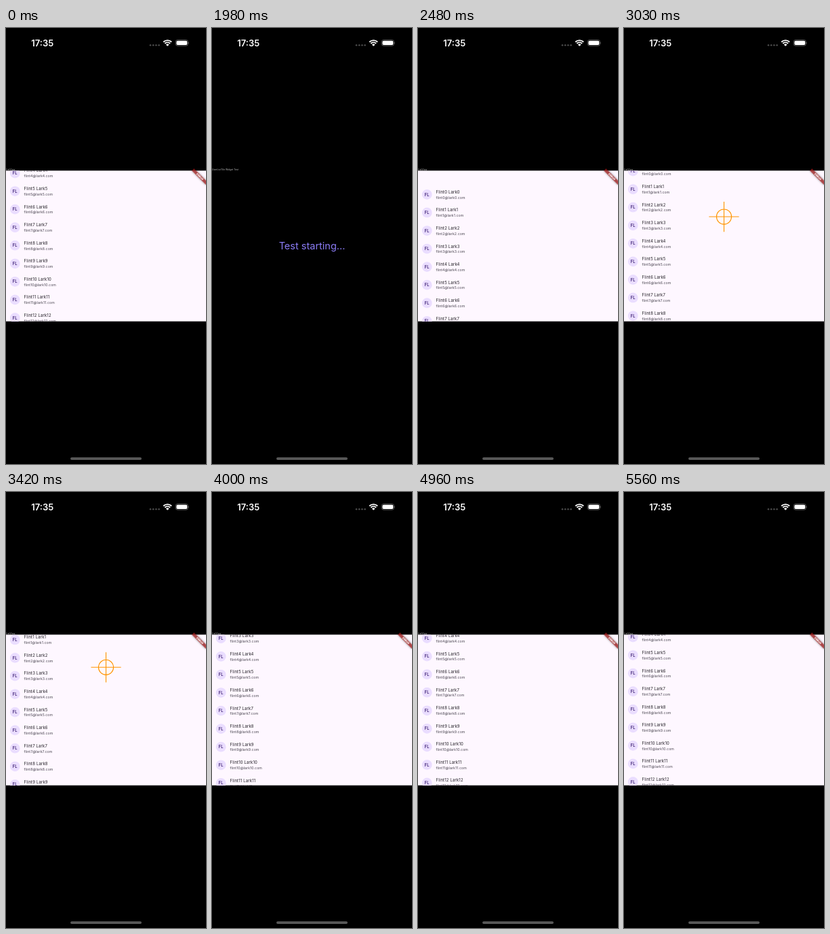
Animation, 295 px wide and 640 px high, one loop 8850 ms. Source, as an HTML page:

```html
<!DOCTYPE html>
<html lang="en">
<head>
<meta charset="utf-8">
<title>List scroll test</title>
<style>
  html, body { margin: 0; height: 100%; overflow: hidden; background: #000; }
  svg { display: block; width: 100vw; height: 100vh; font-family: Inter, sans-serif; }
  .clock { font-size: 13px; font-weight: 600; fill: #fff; }
  .label { font-size: 3.4px; fill: #b8b8b8; }
  .waiting { font-size: 14.5px; fill: #8b7cf6; text-anchor: middle; }
  .initials { font-size: 16px; font-weight: 500; letter-spacing: .15px; fill: #21005d; text-anchor: middle; }
  .name { font-size: 16px; letter-spacing: .5px; fill: #1d1b20; }
  .mail { font-size: 14px; letter-spacing: .25px; fill: #49454f; }
  .banner { font-size: 10.2px; font-weight: 900; fill: #fff; text-anchor: middle; }
</style>
</head>
<body>
<svg viewBox="0 0 295 640">
  <defs>
    <clipPath id="view"><rect width="800" height="600"/></clipPath>
    <filter id="blur" x="-30%" y="-150%" width="160%" height="400%"><feGaussianBlur stdDeviation="3.96"/></filter>
  </defs>
  <rect width="295" height="640"/>

  <!-- Status bar and home indicator -->
  <text class="clock" x="37.3" y="26.6">17:35</text>
  <g fill="#4a4a4a">
    <circle cx="213" cy="25.2" r="1.3"/><circle cx="217.2" cy="25.2" r="1.3"/>
    <circle cx="221.4" cy="25.2" r="1.3"/><circle cx="225.6" cy="25.2" r="1.3"/>
  </g>
  <g fill="none" stroke="#fff" stroke-width="1.9">
    <path d="M232.2 20.5a8.8 8.8 0 0 1 12 0"/>
    <path d="M234.3 22.7a5.7 5.7 0 0 1 7.8 0"/>
  </g>
  <path d="M235.9 24.4a3.3 3.3 0 0 1 4.6 0l-2.3 2.4z" fill="#fff"/>
  <rect x="250.2" y="17.5" width="18.3" height="8.7" rx="2.9" fill="none" stroke="#6a6a6a" stroke-width=".8"/>
  <rect x="251.4" y="18.7" width="15.9" height="6.3" rx="1.8" fill="#fff"/>
  <path d="M269.4 20.4q1.4 1.4 0 2.9z" fill="#777"/>
  <rect x="95" y="630.2" width="105" height="3.8" rx="1.9" fill="#595959"/>

  <text class="label" id="label" x="0" y="209.3"></text>
  <text class="waiting" id="waiting" x="147.5" y="325.4">Test starting...</text>

  <!-- 800 x 600 test surface -->
  <g id="surface" transform="translate(0 209.375) scale(.36875)">
    <rect width="800" height="600" fill="#fef7ff"/>
    <g clip-path="url(#view)"><g id="list"></g></g>
    <g transform="translate(800 0) rotate(45)">
      <rect x="-40" y="28" width="80" height="12" fill="#000" fill-opacity=".5" filter="url(#blur)"/>
      <rect x="-40" y="28" width="80" height="12" fill="#b71c1c" fill-opacity=".63"/>
      <text class="banner" x="0" y="37.7">DEBUG</text>
    </g>
    <path id="pointer" fill="none" stroke="#ff9500" stroke-width="3"
      d="M-30 0a30 30 0 1 0 60 0a30 30 0 1 0-60 0M0-60V60M-60 0H60"/>
  </g>
</svg>
<script>
  const LOOP = 8850, TOP_INSET = 59, ROW = 72, ROWS = 13;
  const [label, waiting, surface, list, pointer] =
    ['label', 'waiting', 'surface', 'list', 'pointer'].map(id => document.getElementById(id));

  const tile = i => `<g transform="translate(0 ${i * ROW + ROW / 2})">
    <circle cx="36" r="20" fill="#eaddff"/>
    <text class="initials" x="36" y="5.8">FL</text>
    <text class="name" x="72" y="-4.2">Flint${i} Lark${i}</text>
    <text class="mail" x="72" y="17">flint${i}@lark${i}.com</text></g>`;
  list.innerHTML = Array.from({ length: ROWS }, (_, i) => tile(i)).join('');
  const rows = [...list.children];

  // Pointer height during the drag: [time, y]
  const drag = [[2590, 300], [2700, 275], [2810, 245], [2920, 214], [3030, 183.5],
    [3150, 160], [3420, 130], [3640, 112]];
  const fling = [3760, 4000, 4120, 4240, 4360, 4480, 4600, 4840, 4960, 5080, 5200, 5320, 5440, 5560];
  const RELEASE = fling[0];

  const flingScroll = t => 374 - 78 * Math.exp(-.00284 * (t - 4000));

  function sceneAt(t) {
    if (t < 1980) return { scroll: flingScroll(fling.at(-1)) };
    if (t < 2190) return { title: 'UserListTile Widget Test', wait: true };
    if (t < 2300) return { title: 'UserListTile Widget Test', single: true, scroll: TOP_INSET };
    if (t < 2480) return { wait: true };
    if (t < drag[0][0]) return { scroll: 0 };
    if (t < RELEASE) {
      const y = drag.findLast(([at]) => at <= t)[1];
      return { scroll: Math.max(0, 276.5 - y), y };
    }
    return { scroll: flingScroll(fling.findLast(at => at <= t)) };
  }

  const show = (el, on) => el.setAttribute('display', on ? 'inline' : 'none');

  function draw(t) {
    const { title = 'ListView', wait = false, single = false, scroll = 0, y } = sceneAt(t);
    label.textContent = title;
    show(waiting, wait);
    show(surface, !wait);
    show(pointer, y !== undefined);
    rows.forEach((row, i) => show(row, !single || i === 0));
    list.setAttribute('transform', `translate(0 ${TOP_INSET - scroll})`);
    if (y !== undefined) pointer.setAttribute('transform', `translate(400 ${y})`);
  }

  const start = performance.now();
  function tick() {
    draw((performance.now() - start) % LOOP);
    requestAnimationFrame(tick);
  }
  tick();
</script>
</body>
</html>
```
